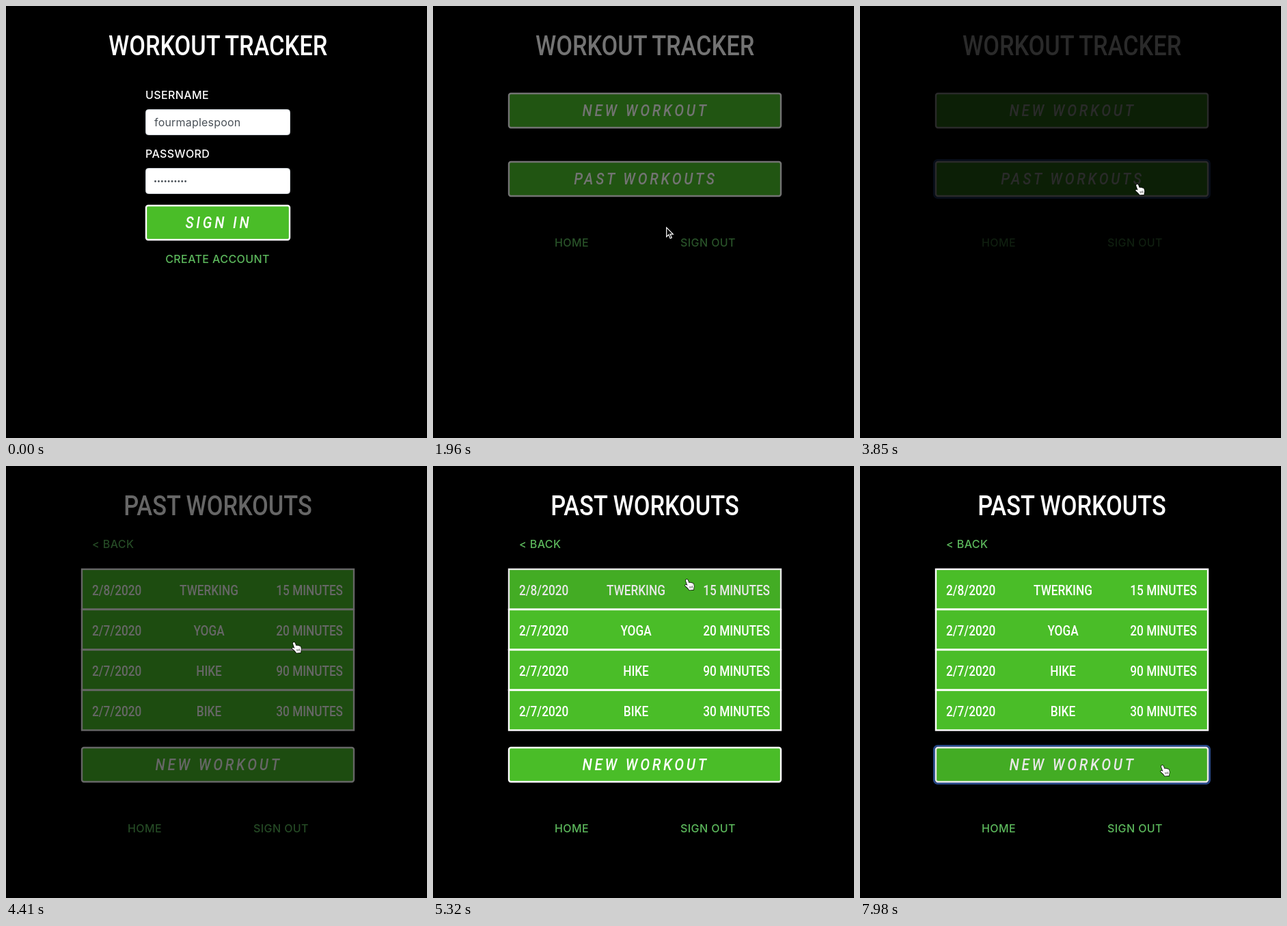
Write an HTML page that moves like this. It is 616 by 632 pixels and loops after 8 s.

```html
<!DOCTYPE html>
<html lang="en">
<head>
<meta charset="utf-8">
<title>Workout tracker</title>
<style>
  html, body { margin: 0; width: 100%; height: 100%; overflow: hidden; background: #000; }
  svg { display: block; width: 616px; height: 632px; }
  text { fill: #fff; white-space: pre; }
  .condensed { font-family: Roboto, sans-serif; font-weight: 500; }
  .title { font-size: 40px; }
  .row { font-size: 20px; }
  .action { font-size: 24px; font-style: italic; letter-spacing: 4.4px; }
  .plain { font: 500 16px Inter, sans-serif; letter-spacing: .4px; }
  .link { fill: #5cb85c; }
  .typed { font-weight: 400; fill: #495057; letter-spacing: .2px; }
  .box { fill: #4abd28; stroke: #fff; stroke-width: 2.4; }
  .field { fill: #fff; stroke: #ced4da; }
  .ring { fill: none; stroke: #2b4f96; stroke-width: 3; }
</style>
</head>
<body>
<svg id="stage" viewBox="0 0 616 632"></svg>
<script>
const LOOP = 8000, STEP = 70, CONDENSE = 0.86;
const stage = document.getElementById('stage');

function add(parent, tag, attrs, content = '') {
  const node = document.createElementNS('http://www.w3.org/2000/svg', tag);
  for (const [name, value] of Object.entries(attrs)) node.setAttribute(name, value);
  node.textContent = content;
  return parent.appendChild(node);
}

const rect = (parent, cls, x, y, width, height, rx = 0) =>
  add(parent, 'rect', { class: cls, x, y, width, height, rx });

const plain = (parent, content, x, y, cls = '', anchor = 'start') =>
  add(parent, 'text', { class: 'plain ' + cls, x, y, 'text-anchor': anchor }, content);

const condensed = (parent, content, x, y, cls, anchor = 'middle') =>
  add(parent, 'text', {
    class: 'condensed ' + cls, 'text-anchor': anchor,
    transform: `translate(${x} ${y}) scale(${CONDENSE} 1)`
  }, content);

// A page is visible between two fades; `hot` lists its clickable areas.
function page(title, fadeIn, fadeOut) {
  const node = add(stage, 'g', {});
  condensed(node, title, 310, 72, 'title');
  return { node, fadeIn, fadeOut, hot: [] };
}

function hotspot(owner, x, y, w, h) {
  const node = add(owner.node, 'g', {});
  const area = { node, x, y, w, h };
  owner.hot.push(area);
  return area;
}

function button(owner, label, x, y, w, clickAt = Infinity) {
  const area = hotspot(owner, x, y, w, 52);
  area.clickAt = clickAt;
  area.ring = rect(area.node, 'ring', x - 1.5, y - 1.5, w + 3, 55, 5);
  rect(area.node, 'box', x + 1, y + 1, w - 2, 50, 3);
  condensed(area.node, label, x + w / 2 + 1, y + 34, 'action');
}

function footer(owner, y) {
  plain(owner.node, 'HOME', 203, y, 'link', 'middle');
  plain(owner.node, 'SIGN OUT', 402.5, y, 'link', 'middle');
}

const signIn = page('WORKOUT TRACKER', [-2, -1], [840, 1260]);
plain(signIn.node, 'USERNAME', 204, 136);
rect(signIn.node, 'field', 204.5, 151.5, 211, 37, 4);
plain(signIn.node, 'fourmaplespoon', 217, 176, 'typed');
plain(signIn.node, 'PASSWORD', 204, 222);
rect(signIn.node, 'field', 204.5, 237.5, 211, 37, 4);
for (let i = 0; i < 10; i++)
  add(signIn.node, 'circle', { cx: 218.5 + i * 4.9, cy: 256.5, r: 1.4, fill: '#495057' });
button(signIn, 'SIGN IN', 204, 291, 212, 700);
plain(signIn.node, 'CREATE ACCOUNT', 309.5, 376, 'link', 'middle');

const home = page('WORKOUT TRACKER', [1680, 2300], [3500, 3920]);
button(home, 'NEW WORKOUT', 110, 127, 400);
button(home, 'PAST WORKOUTS', 110, 227, 400, 3360);
footer(home, 352);

const past = page('PAST WORKOUTS', [4130, 4830], [LOOP, LOOP + 400]);
plain(past.node, '< BACK', 126, 120, 'link');
[
  ['2/8/2020', 'TWERKING', '15 MINUTES'],
  ['2/7/2020', 'YOGA', '20 MINUTES'],
  ['2/7/2020', 'HIKE', '90 MINUTES'],
  ['2/7/2020', 'BIKE', '30 MINUTES']
].forEach(([date, name, length], i) => {
  const y = 150 + i * 59, row = hotspot(past, 110, y, 400, 59).node;
  rect(row, 'box', 111, y + 1, 398, 58.5);
  condensed(row, date, 126, y + 39, 'row', 'start');
  condensed(row, name, 297, y + 39, 'row');
  condensed(row, length, 493, y + 39, 'row', 'end');
});
button(past, 'NEW WORKOUT', 110, 411, 400, 7700);
footer(past, 536);

const arrow = add(stage, 'path', {
  d: 'M.7 1.2V14.5L3.8 11.6 6.1 17 8.3 16 6 10.8H10.3Z',
  fill: '#000', stroke: '#fff', 'stroke-width': 1.2
});
const hand = add(stage, 'g', {});
add(hand, 'path', {
  d: 'M2.6 1.2C3.6.6 4.6 1.2 5 2.2L6.4 6C7 5.2 8.2 5.3 8.6 6.1 9.3 5.5 10.5 5.7 10.9 6.6 ' +
     '11.7 6.2 12.9 6.7 13.2 7.7 13.9 9.8 14.2 11.6 13.4 13.6L13.2 16 6.9 16.4' +
     'C6 14.6 3.8 12.6 1.4 10.6.4 9.6 1.4 8.3 2.8 8.9L4.4 9.9 1.9 3C1.6 2.2 1.9 1.5 2.6 1.2Z',
  fill: '#fff', stroke: '#000', 'stroke-width': 1.4, 'paint-order': 'stroke'
});
add(hand, 'path', { d: 'M7.6 11l.6 3M9.6 10.7l.5 3M11.5 10.4l.3 3', stroke: '#000', 'stroke-width': .6 });

// Pointer stops: time, x, y
const stops = [
  [70, 378, 587], [140, 403, 492], [210, 391, 399], [420, 341, 323], [2380, 341, 323],
  [2870, 384, 279], [3220, 405, 261], [3800, 405, 261], [4410, 421, 258],
  [4830, 418, 250], [5320, 371, 166], [5600, 371, 176], [6720, 345, 346],
  [6930, 348, 354], [7630, 442, 438], [LOOP, 442, 438]
];

const clamp = v => Math.min(1, Math.max(0, v));
const progress = (t, [from, to]) => clamp((t - from) / (to - from));

function pointerAt(t) {
  const next = Math.max(1, stops.findIndex(stop => stop[0] > t));
  const [t0, x0, y0] = stops[next - 1], [t1, x1, y1] = stops[next];
  const u = progress(t, [t0, t1]), eased = u * u * (3 - 2 * u);
  return [x0 + (x1 - x0) * eased, y0 + (y1 - y0) * eased];
}

function draw(t) {
  const [x, y] = pointerAt(t);
  const shown = t >= STEP;
  let pointing = false;
  for (const { node, fadeIn, fadeOut, hot } of [signIn, home, past]) {
    const opacity = progress(t, fadeIn) * (1 - progress(t, fadeOut));
    node.setAttribute('opacity', opacity);
    for (const area of hot) {
      const inside = pad => x >= area.x && x < area.x + area.w &&
        y >= area.y - pad && y < area.y + area.h + pad;
      const live = opacity > 0 && shown;
      pointing ||= live && inside(2);
      area.node.setAttribute('opacity', live && inside(0) && opacity === 1 ? 0.91 : 1);
      area.ring?.setAttribute('visibility', t >= area.clickAt ? 'visible' : 'hidden');
    }
  }
  arrow.setAttribute('display', shown && !pointing ? 'inline' : 'none');
  hand.setAttribute('display', shown && pointing ? 'inline' : 'none');
  arrow.setAttribute('transform', `translate(${x} ${y})`);
  hand.setAttribute('transform', `translate(${x - 3} ${y - 1})`);
}

const start = performance.now();
function tick() {
  const t = (performance.now() - start) % LOOP;
  draw(Math.floor(t / STEP) * STEP);
  requestAnimationFrame(tick);
}
tick();
</script>
</body>
</html>
```
